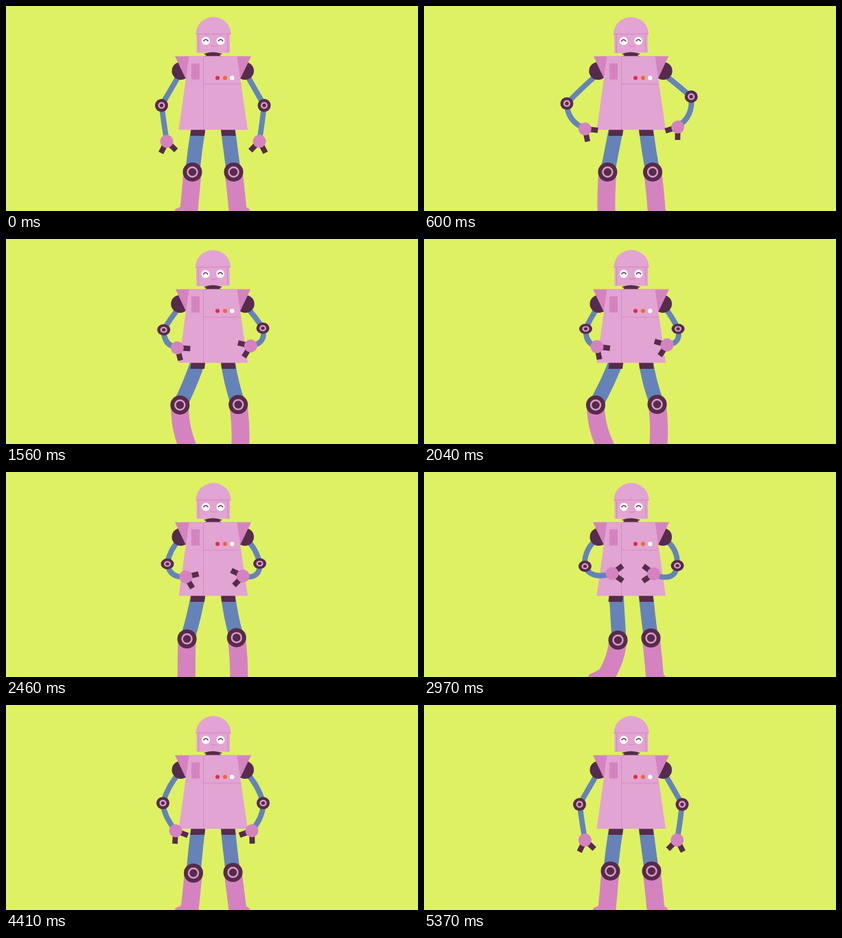
These frames come from a looping animation (600 px wide and 300 px high, 5400 ms). An HTML page without scripts:

```html
<!DOCTYPE html>
<html lang="en">
<head>
<meta charset="utf-8">
<title>Dancing robot</title>
<style>
html, body { margin: 0; width: 100%; height: 100%; overflow: hidden; background: #def163; }
svg { display: block; width: 100vw; height: 100vh; }

.skin { fill: #e2a4d2; }
.pink { fill: #d483c0; }
.dark { fill: #562b4c; }
.line { fill: none; stroke: #d483c0; }
.ring { fill: none; stroke: #dc9ccb; }
.arm { fill: none; stroke: #6583b9; stroke-width: 7.8; }
.thigh { fill: none; stroke: #6583b9; stroke-width: 21; }
.shin { fill: none; stroke: #d483c0; stroke-width: 26; }
.claw { stroke: #562b4c; stroke-width: 7.8; }
.smile { fill: none; stroke: #562b4c; stroke-width: 1.5; }

/* upper body glides, legs spring back and settle */
.glide { animation: 5.4s linear infinite; }
.spring { animation: 5.4s ease-in-out infinite; }

#armL { animation-name: armL; }
#armR { animation-name: armR; }
#foreL { animation-name: foreL; }
#foreR { animation-name: foreR; }
#elbowL { animation-name: elbowL, squash; }
#elbowR { animation-name: elbowR, squash; }
#handL { animation-name: handL; }
#handR { animation-name: handR; }
#thighL { animation-name: thighL; }
#thighR { animation-name: thighR; }
#shinL { animation-name: shinL; }
#shinR { animation-name: shinR; }
#kneeL { animation-name: kneeL; }
#kneeR { animation-name: kneeR; }
#footL { animation-name: footL; }
#footR { animation-name: footR; }
#head { animation-name: nod; transform-origin: 301px 60px; }
#flare { animation-name: flare; transform-origin: 301px 74px; }
#shoulders { animation-name: shrug; transform-origin: 302px 95px; }
#eyeL { animation-name: winkL; transform-origin: 291px 51px; }
#eyeR { animation-name: winkR; transform-origin: 312.5px 51px; }

@keyframes armL {
  0% { d: path("M254 98Q240 122 226.5 145.5"); animation-timing-function: ease-in-out; }
  19.4%, 21.7% { d: path("M252 101Q222 120 197 141"); animation-timing-function: cubic-bezier(.2,.7,.4,1); }
  37.8% { d: path("M254 98Q243 115 235.5 131"); }
  55% { d: path("M254 97Q233 111 234 138"); }
  66.7% { d: path("M254 97Q234 113 231.5 141"); }
  81.7% { d: path("M254 98Q236 117 228.5 143.5"); }
  100% { d: path("M254 98Q240 122 226.5 145.5"); }
}
@keyframes armR {
  0% { d: path("M349 98Q362 121 376 145.5"); animation-timing-function: ease-in-out; }
  19.4%, 21.7% { d: path("M350 101Q373 112 397 125"); animation-timing-function: cubic-bezier(.2,.7,.4,1); }
  37.8% { d: path("M349 98Q361 113 370 131.5"); }
  55% { d: path("M349 97Q370 111 369 137"); }
  66.7% { d: path("M349 97Q369 113 371.5 140.5"); }
  81.7% { d: path("M349 98Q368 118 374.5 143.5"); }
  100% { d: path("M349 98Q362 121 376 145.5"); }
}
@keyframes foreL {
  0% { d: path("M226.5 145.5Q230 172 234 198"); animation-timing-function: ease-in-out; }
  19.4%, 21.7% { d: path("M197 141Q196 167 234 168"); animation-timing-function: cubic-bezier(.2,.7,.4,1); }
  37.8% { d: path("M235.5 131Q235 154 252 157"); }
  55% { d: path("M234 138Q243 158 274 149"); }
  66.7% { d: path("M231.5 141Q236 162 268 159"); }
  81.7% { d: path("M228.5 143.5Q230 163 247 184"); }
  100% { d: path("M226.5 145.5Q230 172 234 198"); }
}
@keyframes foreR {
  0% { d: path("M376 145.5Q373 172 369 198"); animation-timing-function: ease-in-out; }
  19.4%, 21.7% { d: path("M397 125Q404 156 370 163"); animation-timing-function: cubic-bezier(.2,.7,.4,1); }
  37.8% { d: path("M370 131.5Q375 153 354 155"); }
  55% { d: path("M369 137Q365 162 335 150"); }
  66.7% { d: path("M371.5 140.5Q368 163 340 160"); }
  81.7% { d: path("M374.5 143.5Q375 163 358 184"); }
  100% { d: path("M376 145.5Q373 172 369 198"); }
}
@keyframes elbowL {
  0% { translate: 226.5px 145.5px; animation-timing-function: ease-in-out; }
  19.4%, 21.7% { translate: 197px 141px; animation-timing-function: cubic-bezier(.2,.7,.4,1); }
  37.8% { translate: 235.5px 131.5px; }
  55% { translate: 234.5px 138px; }
  66.7% { translate: 231.5px 141px; }
  81.7% { translate: 228.5px 143.5px; }
  100% { translate: 226.5px 145.5px; }
}
@keyframes elbowR {
  0% { translate: 376px 145.5px; animation-timing-function: ease-in-out; }
  19.4%, 21.7% { translate: 397px 125px; animation-timing-function: cubic-bezier(.2,.7,.4,1); }
  37.8% { translate: 370px 131.5px; }
  55% { translate: 369px 137px; }
  66.7% { translate: 371.5px 140.5px; }
  81.7% { translate: 374.5px 143.5px; }
  100% { translate: 376px 145.5px; }
}
@keyframes squash {
  0%, 100% { scale: 1 1; }
  21.7% { scale: 1 .92; }
  37.8% { scale: 1 .8; }
  55% { scale: 1 .86; }
  66.7% { scale: 1 .9; }
  81.7% { scale: 1 .95; }
}
@keyframes handL {
  0% { translate: 234px 198px; rotate: -10deg; animation-timing-function: ease-in-out; }
  19.4%, 21.7% { translate: 234.5px 169px; rotate: -71deg; animation-timing-function: cubic-bezier(.2,.7,.4,1); }
  37.8% { translate: 252px 157.5px; rotate: -47deg; }
  55% { translate: 274px 148.5px; rotate: -91deg; }
  66.7% { translate: 268px 159.5px; rotate: -78deg; }
  81.7% { translate: 247px 184px; rotate: -33deg; }
  100% { translate: 234px 198px; rotate: -10deg; }
}
@keyframes handR {
  0% { translate: 369px 198px; rotate: 8deg; animation-timing-function: ease-in-out; }
  19.4%, 21.7% { translate: 370px 164.5px; rotate: 54deg; animation-timing-function: cubic-bezier(.2,.7,.4,1); }
  37.8% { translate: 354px 155px; rotate: 70deg; }
  55% { translate: 334.5px 149px; rotate: 92deg; }
  66.7% { translate: 340px 160px; rotate: 83deg; }
  81.7% { translate: 358px 184px; rotate: 34deg; }
  100% { translate: 369px 198px; rotate: 8deg; }
}

@keyframes thighL {
  0% { d: path("M280 178Q275 210 271.5 243"); animation-timing-function: ease-in; }
  21.7% { d: path("M280 178Q271 210 259 243"); animation-timing-function: ease-out; }
  37.8% { d: path("M280 178Q270 206 250 243"); }
  55% { d: path("M280 178Q282 212 284 246"); }
  66.7% { d: path("M280 178Q274 210 268 245"); }
  81.7% { d: path("M280 178Q276 210 273 246"); }
  100% { d: path("M280 178Q275 210 271.5 243"); }
}
@keyframes thighR {
  0% { d: path("M323 178Q327 210 331.5 243"); animation-timing-function: ease-in; }
  21.7% { d: path("M323 178Q327 210 336 243"); animation-timing-function: ease-out; }
  37.8% { d: path("M323 178Q327 208 339.5 242"); }
  55% { d: path("M323 178Q326 210 330.5 243"); }
  66.7% { d: path("M323 178Q327 210 336.5 243"); }
  81.7% { d: path("M323 178Q326 210 330.5 245"); }
  100% { d: path("M323 178Q327 210 331.5 243"); }
}
@keyframes shinL {
  0% { d: path("M271.5 243Q269 272 266 304"); animation-timing-function: ease-in; }
  21.7% { d: path("M259 243Q256 275 265 304"); animation-timing-function: ease-out; }
  37.8% { d: path("M250 243Q250 275 265 305"); }
  55% { d: path("M282.5 246Q280 278 260 306"); }
  66.7% { d: path("M268 245Q267 275 266 304"); }
  81.7% { d: path("M273 246Q270 275 267 304"); }
  100% { d: path("M271.5 243Q269 272 266 304"); }
}
@keyframes shinR {
  0% { d: path("M331.5 243Q335 272 338 304"); animation-timing-function: ease-in; }
  21.7% { d: path("M336 243Q341 270 341 304"); animation-timing-function: ease-out; }
  37.8% { d: path("M339.5 242Q344 275 341 304"); }
  55% { d: path("M330.5 243Q334 272 336.5 304"); }
  66.7% { d: path("M336.5 243Q339 272 340 304"); }
  81.7% { d: path("M330.5 245Q334 272 338 304"); }
  100% { d: path("M331.5 243Q335 272 338 304"); }
}
@keyframes kneeL {
  0% { translate: 271.5px 243px; animation-timing-function: ease-in; }
  21.7% { translate: 259px 243px; animation-timing-function: ease-out; }
  37.8% { translate: 250px 243px; }
  55% { translate: 282.5px 246px; }
  66.7% { translate: 268px 245px; }
  81.7% { translate: 273px 246px; }
  100% { translate: 271.5px 243px; }
}
@keyframes kneeR {
  0% { translate: 331.5px 243px; animation-timing-function: ease-in; }
  21.7% { translate: 336px 243px; animation-timing-function: ease-out; }
  37.8% { translate: 339.5px 242px; }
  55% { translate: 330.5px 243px; }
  66.7% { translate: 336.5px 243px; }
  81.7% { translate: 330.5px 245px; }
  100% { translate: 331.5px 243px; }
}
@keyframes footL {
  0%, 66.7%, 81.7%, 100% { translate: 0 0; }
  21.7%, 37.8% { translate: 3px 14px; }
  55% { translate: -6px -1px; }
}
@keyframes footR {
  0%, 66.7%, 81.7%, 100% { translate: 0 0; }
  21.7% { translate: 0 6px; }
  37.8% { translate: 0 14px; }
  55% { translate: -3px 1px; }
}

@keyframes nod {
  0%, 37.8%, 100% { translate: 0 0; rotate: 0deg; }
  21.7% { translate: -.5px .3px; rotate: -1.5deg; }
}
@keyframes flare {
  0%, 37.8%, 100% { scale: 1 1; }
  21.7% { scale: .97 1; }
}
@keyframes shrug {
  0%, 37.8%, 100% { translate: 0 0; scale: 1 1; }
  21.7% { translate: -.5px 0; scale: 1.03 1; }
}
@keyframes winkL {
  0%, 14%, 29%, 100% { scale: 1 1; }
  21.7% { scale: 1 .7; }
}
@keyframes winkR {
  0%, 60%, 73%, 100% { scale: 1 1; }
  66.7% { scale: 1 .78; }
}
</style>
</head>
<body>
<svg viewBox="0 0 600 300">
  <defs>
    <g id="knee">
      <circle class="dark" r="14"/>
      <circle class="ring" r="7" stroke-width="2.4"/>
    </g>
    <g id="elbow">
      <circle class="dark" r="9.5"/>
      <circle class="ring" r="3.9" stroke-width="2.4"/>
    </g>
    <g id="hand">
      <path class="claw" d="M0 0V19" transform="rotate(36)"/>
      <path class="claw" d="M0 0V19" transform="rotate(-36)"/>
      <circle class="pink" r="9.5"/>
    </g>
  </defs>

  <rect width="600" height="300" fill="#def163"/>

  <path id="armL" class="arm glide"/>
  <path id="armR" class="arm glide"/>
  <g id="shoulders" class="dark glide">
    <circle cx="254.5" cy="95" r="13"/>
    <circle cx="348" cy="95" r="13"/>
  </g>

  <path id="thighL" class="thigh spring"/>
  <path id="thighR" class="thigh spring"/>
  <path class="dark" d="M270 178H290.500L289 190H268.500Z"/>
  <path class="dark" d="M313 178H333L334.500 190H314Z"/>
  <path id="shinL" class="shin spring"/>
  <path id="shinR" class="shin spring"/>
  <path id="footL" class="pink spring" d="M268 286L254 294L247 297L242 306H280Z"/>
  <path id="footR" class="pink spring" d="M335 286L349 294L354 297L359 306H326Z"/>
  <use id="kneeL" class="spring" href="#knee"/>
  <use id="kneeR" class="spring" href="#knee"/>

  <g id="head" class="glide">
    <path class="skin" d="M276.500 41A25.500 25 0 0 1 327.500 41L326 42V68.500H277.500V42Z"/>
    <path class="line" d="M276.500 41H327.500M280.500 42V68M323 42V68"/>
    <path class="line" d="M298.500 57.500Q303 60.500 307.500 57.500"/>
    <g id="eyeL" class="glide">
      <circle cx="291" cy="51" r="6" fill="#fff"/>
      <path class="smile" d="M287.500 51.500Q291 46.500 294.500 51.500"/>
    </g>
    <g id="eyeR" class="glide">
      <circle cx="312.500" cy="51" r="6" fill="#fff"/>
      <path class="smile" d="M309 51.500Q312.500 46.500 316 51.500"/>
    </g>
  </g>
  <path class="dark" d="M288 70Q301 65 315 70L311 72L316 75H286L292 72Z"/>

  <path id="flare" class="pink glide" d="M246 73.600H357L342 105H261Z"/>
  <path class="skin" d="M266.500 73.600H336.500L352 181.300H251.500Z"/>
  <rect class="pink" x="270" y="84" width="12" height="23.500"/>
  <path class="line" d="M287.500 75V181M287.500 114.300H342" stroke-width=".8"/>
  <circle cx="308" cy="105.200" r="3" fill="#e12b45"/>
  <circle cx="319" cy="105.200" r="3" fill="#f2662a"/>
  <circle cx="329.300" cy="105.200" r="3.200" fill="#fff"/>

  <path id="foreL" class="arm glide"/>
  <path id="foreR" class="arm glide"/>
  <use id="elbowL" class="glide" href="#elbow"/>
  <use id="elbowR" class="glide" href="#elbow"/>
  <use id="handL" class="glide" href="#hand"/>
  <use id="handR" class="glide" href="#hand"/>
</svg>
</body>
</html>
```
